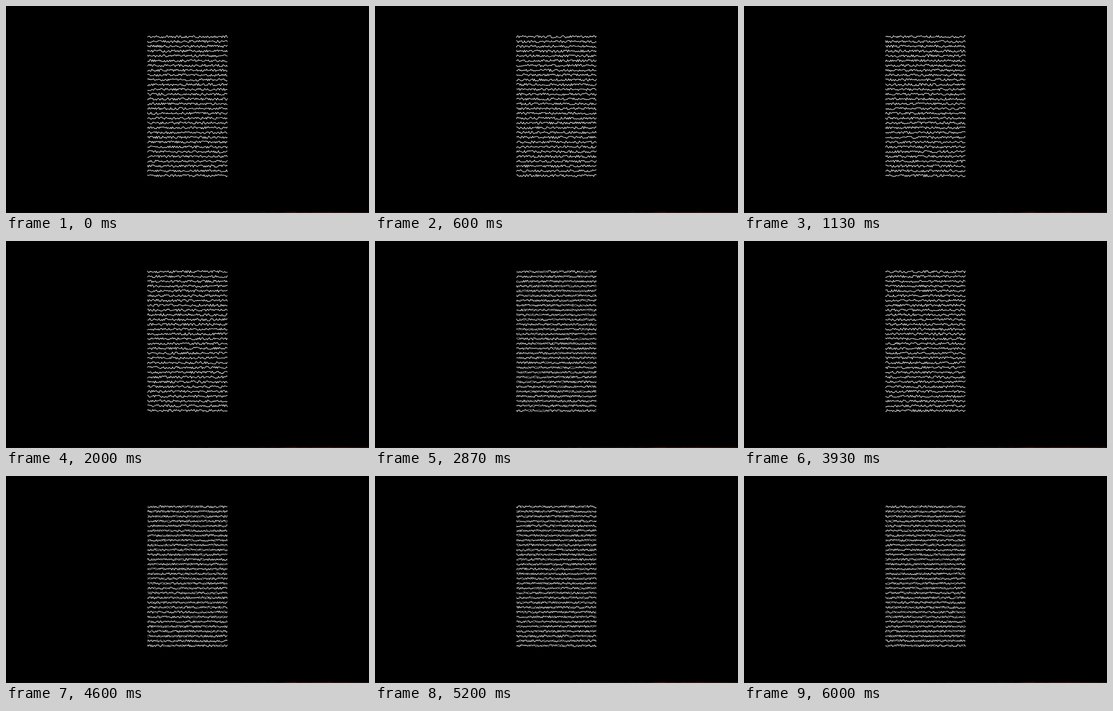
An HTML page with a canvas that plays this animation: 700x400 px, repeating every 6070 ms.

```html
<!DOCTYPE html>
<html lang="en">
<head>
<meta charset="utf-8">
<title>Noise lines</title>
<style>
  html, body { margin: 0; width: 100%; height: 100%; overflow: hidden; background: #000; }
  canvas { display: block; }
</style>
</head>
<body>
<canvas id="stage" width="700" height="400"></canvas>
<script>
const ctx = document.getElementById('stage').getContext('2d');
const LOOP = 6070, STEP = 1000 / 15, LAST_STEP = 90;
const ROWS = 30, TOP = 59.4, ROW_GAP = 9.255;
const LEFT = 272.6, RIGHT = 427, POINTS = 90, AMPLITUDE = 2.35;

function seededRandom(seed) {
  let s = Math.imul(seed + 1, 0x9E3779B1) >>> 0;
  return () => {
    s = (s + 0x6D2B79F5) >>> 0;
    let v = Math.imul(s ^ (s >>> 15), s | 1);
    v ^= v + Math.imul(v ^ (v >>> 7), v | 61);
    return ((v ^ (v >>> 14)) >>> 0) / 4294967296;
  };
}

function drawLines(seed, alpha) {
  const random = seededRandom(seed);
  const dx = (RIGHT - LEFT) / (POINTS - 1);
  ctx.beginPath();
  for (let row = 0; row < ROWS; row++) {
    const y = TOP + row * ROW_GAP;
    for (let i = 0; i < POINTS; i++) {
      const py = y + (random() * 2 - 1) * AMPLITUDE;
      if (i) ctx.lineTo(LEFT + i * dx, py);
      else ctx.moveTo(LEFT, py);
    }
  }
  ctx.strokeStyle = `rgba(245, 242, 245, ${alpha})`;
  ctx.stroke();
}

const edge = ctx.createLinearGradient(0, 0, 700, 0);
edge.addColorStop(0, '#0a0506');
edge.addColorStop(0.5, '#0d090a');
edge.addColorStop(0.74, '#160e0e');
edge.addColorStop(0.78, '#32150f');
edge.addColorStop(0.95, '#2c130d');
edge.addColorStop(1, '#170c0a');

// Dim, uneven strip along the bottom of the stage.
function drawEdge() {
  const random = seededRandom(7);
  ctx.fillStyle = edge;
  for (let x = 0; x < 700; x += 10) {
    const height = 1 + random() * 0.9 + (x > 380 ? 0.5 : 0);
    ctx.fillRect(x, 400 - height, 10, height);
  }
}

function draw(step) {
  ctx.globalCompositeOperation = 'source-over';
  ctx.fillStyle = '#000';
  ctx.fillRect(0, 0, 700, 400);
  drawEdge();

  ctx.globalCompositeOperation = 'lighter';
  ctx.lineWidth = 1.1;
  ctx.lineJoin = 'round';
  // Some steps mix two successive noise fields.
  if ([1, 4, 6].includes(step % 7)) {
    drawLines(step * 2, 0.6);
    drawLines(step * 2 + 1, 0.42);
  } else {
    drawLines(step * 2, 0.96);
  }
}

const start = performance.now();
let shown = -1;
function tick() {
  const t = (performance.now() - start) % LOOP;
  const step = Math.min(LAST_STEP, Math.floor((t + 4) / STEP));
  if (step !== shown) draw(shown = step);
  requestAnimationFrame(tick);
}
tick();
</script>
</body>
</html>
```
